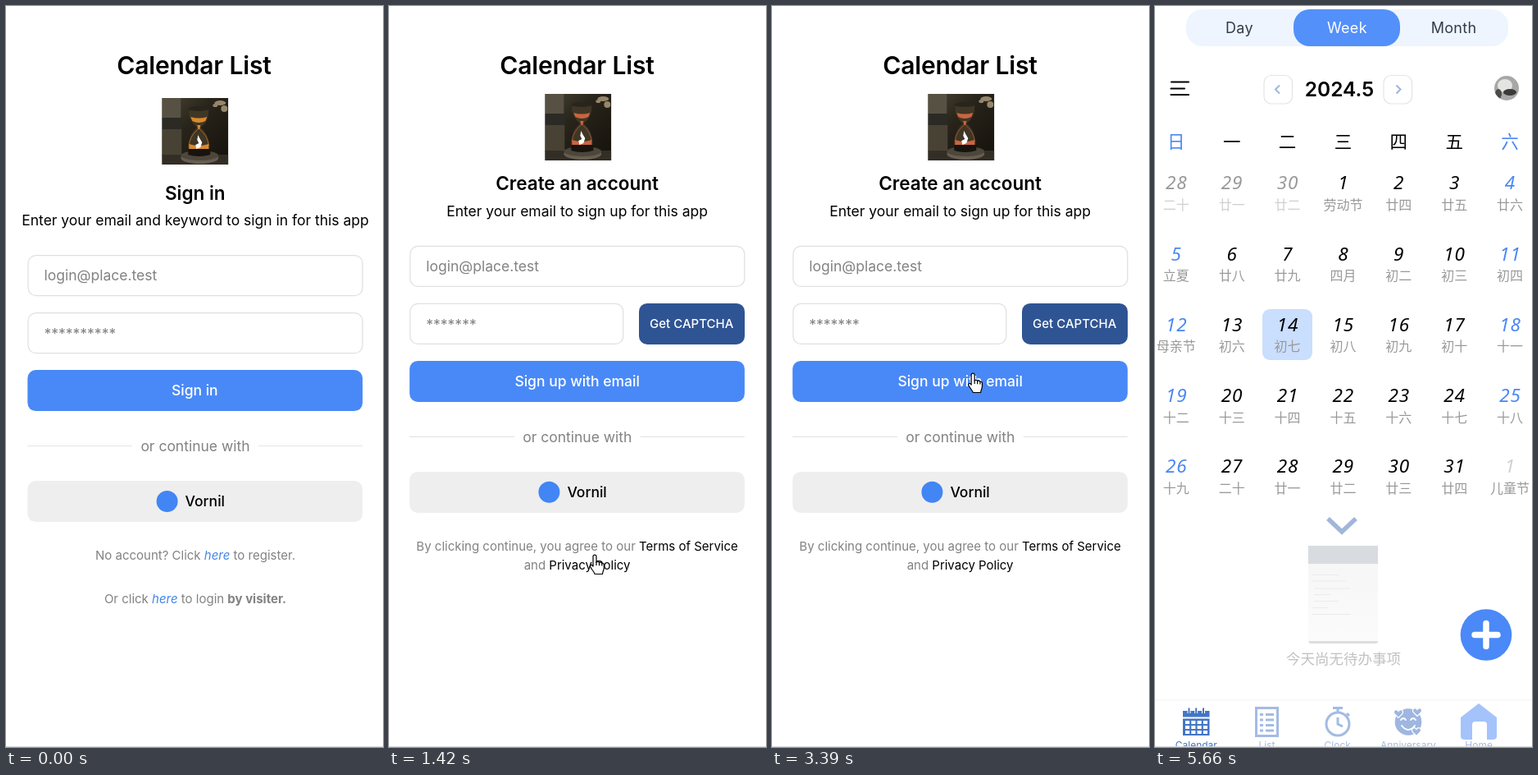
Animation of 460x902 px, one loop 6060 ms. Source, as an HTML page:

```html
<!DOCTYPE html>
<html lang="zh-CN">
<head>
<meta charset="utf-8">
<title>Calendar List</title>
<style>
html, body { margin: 0; width: 100%; height: 100%; overflow: hidden; background: #fff; }
svg { display: block; width: 100%; height: 100%; }
text { font: 17.5px Inter, sans-serif; white-space: pre; }
.mid { text-anchor: middle; }
.title { font-size: 30px; font-weight: 600; letter-spacing: -.005em; }
.head { font-size: 22.5px; font-weight: 600; }
.grey { fill: #828282; }
.med { font-weight: 500; }
.small { font-size: 15px; }
.link { fill: #4285e8; font-style: italic; }
.field { fill: #fff; stroke: #e0e0e0; stroke-width: 1.25; }
.line { fill: none; stroke: #e4e4e4; stroke-width: 1.2; }
.seg { font-size: 18px; letter-spacing: .3px; fill: #343a48; }
.day { font: italic 500 22.5px "Noto Sans", sans-serif; letter-spacing: .8px; }
.cjk { font: 16px "Noto Sans CJK SC", "Noto Sans CJK", sans-serif; }
.tab { font-size: 12px; fill: #a3bbe4; }
</style>
</head>
<body>
<svg viewBox="0 0 460 902">
  <defs>
    <clipPath id="square"><path d="M0 0H81V81H0Z"/></clipPath>
    <clipPath id="disc"><circle cx="429" cy="100" r="15"/></clipPath>
    <linearGradient id="wall" x2="1" y2="1">
      <stop stop-color="#484434"/><stop offset=".4" stop-color="#28241a"/><stop offset="1" stop-color="#14110c"/>
    </linearGradient>
    <linearGradient id="paper" x2="0" y2="1">
      <stop stop-color="#f5f5f5"/><stop offset="1" stop-color="#fbfbfb"/>
    </linearGradient>
    <g id="photo" clip-path="url(#square)">
      <path fill="url(#wall)" d="M0 0H81V81H0Z"/>
      <path fill="#565143" d="M0 0H23V24H0Z"/>
      <path fill="#2b2a24" d="M0 24H24V38H0Z"/>
      <path fill="#474233" d="M0 38H24V70H0Z"/>
      <path fill="#332e25" d="M0 69H81V81H0Z"/>
      <g fill="#96866a">
        <ellipse cx="71" cy="6" rx="7" ry="3"/><ellipse cx="76" cy="13" rx="4" ry="4"/><ellipse cx="65" cy="9" rx="3" ry="2"/>
      </g>
      <ellipse cx="46" cy="73" rx="23" ry="7" fill="#665e50"/>
      <ellipse cx="46" cy="70" rx="23" ry="6" fill="#4d463a"/>
      <path fill="#403625" d="M33 14Q45 8 57 14Q58 28 47 36Q59 46 58 64H32Q31 46 43 36Q32 28 33 14Z"/>
      <path fill="currentColor" d="M35 23Q45 26 55 23L53 28Q45 32 37 28ZM43 33H47L46 38H44ZM33 56Q45 60 57 56V63H33Z"/>
      <path fill="none" stroke="currentColor" opacity=".6" d="M44 38Q34 46 33 58M46 38Q56 46 57 58"/>
      <path fill="#fff" d="M44 45L46 49L49 54L47 60L42 62L41 57L45 55L43 51Z"/>
      <path fill="#17130e" d="M32 62H59V69Q45 73 32 69Z"/>
      <ellipse cx="45" cy="13" rx="13" ry="3" fill="#2a251c"/>
    </g>
    <g id="form">
      <rect class="field" x="27" y="303.6" width="408" height="49" rx="9.5"/>
      <text class="grey" x="46.5" y="334.4">login@place.test</text>
      <rect x="26.3" y="443.1" width="408.8" height="50" rx="10" fill="#4989f7"/>
      <path class="line" d="M26.3 535.5H154M308 535.5H435"/>
      <text class="mid grey" x="231" y="542">or continue with</text>
      <rect x="26.3" y="578.1" width="408.8" height="50" rx="10" fill="#eee"/>
      <circle cx="196.6" cy="603" r="13" fill="#4285f4"/>
      <text class="med" x="218.6" y="609.4">Vornil</text>
    </g>
  </defs>

  <g id="signIn">
    <text class="mid title" x="229.5" y="83">Calendar List</text>
    <use href="#photo" x="190.3" y="112" color="#d98a2e"/>
    <text class="mid head" x="230.8" y="235.8">Sign in</text>
    <text class="mid" x="231" y="267">Enter your email and keyword to sign in for this app</text>
    <use href="#form"/>
    <rect class="field" x="27" y="373.6" width="408" height="49" rx="9.5"/>
    <text class="grey" x="46.5" y="404.8">**********</text>
    <text class="mid med" x="230.3" y="474.4" fill="#fff">Sign in</text>
    <text class="mid small grey" x="231" y="674.3">No account? Click <tspan class="link">here</tspan> to register.</text>
    <text class="mid small grey" x="231" y="726.8">Or click <tspan class="link">here</tspan> to login <tspan font-weight="700">by visiter.</tspan></text>
  </g>

  <g id="signUp">
    <text class="mid title" x="229.5" y="83">Calendar List</text>
    <use href="#photo" x="190.3" y="107" color="#cb6440"/>
    <text class="mid head" x="229.6" y="224.4">Create an account</text>
    <text class="mid" x="229.6" y="255.7">Enter your email to sign up for this app</text>
    <use href="#form" x="-1.2" y="-11.2"/>
    <rect class="field" x="25.8" y="362.4" width="260" height="49" rx="9.5"/>
    <text class="grey" x="45.3" y="393.7">*******</text>
    <rect x="305" y="361.9" width="129" height="50" rx="10" fill="#2f5493"/>
    <text class="mid med small" x="369.2" y="392.4" fill="#fff">Get CAPTCHA</text>
    <text class="mid med" x="229.6" y="463.2" fill="#fff">Sign up with email</text>
    <text class="mid small grey" x="229.6" y="663">By clicking continue, you agree to our <tspan fill="#000">Terms of Service</tspan></text>
    <text class="mid small grey" x="229.6" y="685.6">and <tspan fill="#000">Privacy Policy</tspan></text>
  </g>

  <g id="calendar">
    <rect x="38" y="4" width="393" height="45" rx="20" fill="#eef5fe"/>
    <rect x="169" y="4" width="130" height="45" rx="20" fill="#5490fa"/>
    <text class="mid seg" x="103" y="33">Day</text>
    <text class="mid seg" x="234.4" y="33" style="fill:#fff">Week</text>
    <text class="mid seg" x="364.5" y="33">Month</text>
    <path d="M20 92.5H41M19.5 100.5H36M19.5 108H41" stroke="#000" stroke-width="2.2" stroke-linecap="round"/>
    <g class="line">
      <rect x="133" y="84.5" width="34.5" height="34.5" rx="9"/>
      <rect x="279" y="84.5" width="34.5" height="34.5" rx="9"/>
    </g>
    <path d="M152 96.5L147 101.5L152 106.5M294.5 96.5L299.5 101.5L294.5 106.5" fill="none" stroke="#9fb5db" stroke-width="2"/>
    <text class="mid" x="225" y="109.5" style="font-size:24.5px;font-weight:600">2024.5</text>
    <g clip-path="url(#disc)">
      <path fill="#a8a8a6" d="M414 85H444V115H414Z"/>
      <ellipse cx="427" cy="97" rx="9" ry="8" fill="#e4e4e2"/>
      <ellipse cx="433" cy="105" rx="8" ry="4" fill="#3b3b3a"/>
      <ellipse cx="419" cy="107" rx="4" ry="6" fill="#4a4a48"/>
    </g>
    <rect x="131" y="369" width="61" height="62" rx="9" fill="#cadefd"/>
    <g id="grid"></g>
    <path d="M211 624L228 640L245 624" fill="none" stroke="#a2b6d9" stroke-width="5.5"/>
    <rect x="187.5" y="659" width="84.5" height="117" rx="2" fill="#dedede"/>
    <path fill="url(#paper)" d="M187 657H272V773H187Z"/>
    <path fill="#d8dce0" d="M187 657H272V679H187Z"/>
    <path d="M192 692.5H225M192 700H232M195 709H238M194 716.5H215M194 724.5H224M192 732.5H211M192 740.5H239" stroke="#ebebeb"/>
    <text class="mid cjk" x="230" y="801" fill="#c2c2c2" style="font-size:17.5px">今天尚无待办事项</text>
    <circle cx="404" cy="765.5" r="31.3" fill="#4a89f7"/>
    <path d="M390 765.5H418M404 751.5V779.5" stroke="#fff" stroke-width="7.5" stroke-linecap="round"/>
    <path d="M0 845H460" stroke="#f1f1f1"/>

    <g fill="#4375c6">
      <path d="M34 858H66.5V865.5H34Z"/>
      <path d="M34 867.5H66.5V888H34Z"/>
      <path d="M41.5 855V861M50.2 855V861M59 855V861" stroke="#fff" stroke-width="4"/>
      <path d="M41.5 854.5V861M50.2 854.5V861M59 854.5V861" stroke="#4375c6" stroke-width="2"/>
      <path d="M37 872H64M37 878H64M37 884H64" stroke="#fff" stroke-width="3.8" stroke-dasharray="5.1 2.2"/>
    </g>
    <g fill="none" stroke="#a3bbe4" stroke-width="3">
      <path d="M123.5 854.5H149.5V888.5H123.5Z"/>
      <path d="M128 862.5H132M135 862.5H145M128 869H132M135 869H145M128 875.5H132M135 875.5H145M128 882H132M135 882H145"/>
      <circle cx="223" cy="874" r="14"/>
      <path d="M217 854.5H229M223 855V860M234 861L237 864M223 866V874L229 877"/>
    </g>
    <circle cx="309" cy="871.5" r="16.3" fill="#9fb6e0"/>
    <path d="M300 869Q303 865 306 869M312 869Q315 865 318 869M301 876Q309 886 317 876" fill="none" stroke="#fff" stroke-width="2" stroke-linecap="round"/>
    <g id="hearts" fill="#9fb6e0" stroke="#fff" stroke-width="1.2"></g>
    <path d="M373 870V866L395 849L417 866V889Q417 893 412 893H403V876H387V893H378Q373 893 373 889Z" fill="#a4c3fb"/>
    <path d="M387 893V875Q387 871 391 871H401Q405 871 405 875V893Z" fill="#fff"/>
    <g id="tabs"></g>
  </g>

  <path d="M0 901.5H460" stroke="#dcdcdc"/>
  <g id="cursor" stroke="#000" fill="#fff" stroke-linejoin="round">
    <path id="arrow" d="M.5 .5V16.5L4.2 13.2L7 19.5L9.4 18.4L6.7 12.3H11.8Z"/>
    <g id="hand" stroke-width="1.2">
      <path d="M-2 13V1.2a2 2 0 0 1 4 0V8c1-1 3-.9 3.5.6 1-.9 2.8-.6 3.3.9 1.2-.6 2.5 0 2.5 1.8V15c0 3-1.6 4-1.8 7.5H0C-.4 20-3 18-5.3 13.7c-.8-1.6 1.2-3 2.4-1.8Z"/>
      <path fill="none" d="M2 7.5V12M5.5 8.6V12.2M8.8 9.6V12.6"/>
    </g>
  </g>
</svg>
<script>
const $ = id => document.getElementById(id);
const LOOP = 6060, STEP = 68, BLUE = '#4a87f3';
const label = (cls, x, y, fill, s) => `<text class="mid ${cls}" x="${x}" y="${y}" style="fill:${fill}">${s}</text>`;

// Month grid
const lunar = ('二十 廿一 廿二 劳动节 廿四 廿五 廿六 立夏 廿八 廿九 四月 初二 初三 初四 ' +
  '母亲节 初六 初七 初八 初九 初十 十一 十二 十三 十四 十五 十六 十七 十八 ' +
  '十九 二十 廿一 廿二 廿三 廿四 儿童节').split(' ');
const colX = c => 25.8 + 67.87 * c;
const dayColor = (i, c) => i < 3 ? '#999' : i > 33 ? '#d0d0d0' : c % 6 ? '#000' : BLUE;
let grid = '';
[...'日一二三四五六'].forEach((s, c) => {
  grid += `<text class="mid cjk" x="${colX(c)}" y="173" style="font-size:21.5px;fill:${c % 6 ? '#000' : BLUE}">${s}</text>`;
});
lunar.forEach((s, i) => {
  const c = i % 7, y = 223.3 + 86.2 * Math.floor(i / 7);
  const day = i < 3 ? 28 + i : (i - 3) % 31 + 1;
  grid += label('day', colX(c) + .4, y, dayColor(i, c), day);
  grid += label('cjk', colX(c), y + 24.7, i < 3 ? '#cfcfcf' : '#999', s);
});
$('grid').innerHTML = grid;

$('tabs').innerHTML = ['Calendar', 'List', 'Clock', 'Anniversary', 'Home']
  .map((s, i) => label('tab', 50.3 + 86.2 * i, 904, i ? '#a3bbe4' : '#4375c6', s)).join('');
$('hearts').innerHTML = [[320, 859], [297, 861], [319, 883]]
  .map(([x, y]) => `<path transform="translate(${x} ${y})" d="M0 5.5L-5 .5C-7-4-2-6 0-2.5C2-6 7-4 5 .5Z"/>`).join('');

// Pointer moves: start time, steps, easing, Bezier points
const linear = s => s;
const easeIn = s => s * s;
const easeOut = s => 1 - (1 - s) ** 2;
const easeBoth = s => s * s * (3 - 2 * s);
const moves = [
  [400, 9, easeOut, [[412, 931], [251, 670]]],
  [1020, 2, linear, [[251, 670], [251, 669]]],
  [1960, 9, easeBoth, [[251, 669], [137, 354]]],
  [2580, 9, linear, [[137, 354], [160, 280], [361, 390], [270, 433]]],
  [3200, 4, easeOut, [[270, 433], [243.5, 449]]],
  [5000, 3, easeIn, [[243, 448], [413, 580]]],
  [5460, 3, linear, [[408.5, 779], [452, 888]]]
];

function bezier(pts, s) {
  while (pts.length > 1)
    pts = pts.slice(1).map((p, i) => p.map((v, j) => pts[i][j] + (v - pts[i][j]) * s));
  return pts[0];
}

const show = (id, on) => $(id).setAttribute('display', on ? 'inline' : 'none');

function draw() {
  const t = performance.now() % LOOP;
  show('signIn', t < 1290);
  show('signUp', t >= 1290 && t < 4320);
  show('calendar', t >= 4320);

  const move = moves.filter(m => m[0] <= t).pop();
  const hand = t >= 950 && t < 4320;
  show('cursor', move && (t < 5190 || t >= 5460 && t < 5660));
  show('hand', hand);
  show('arrow', !hand);
  if (move) {
    const [start, n, ease, pts] = move;
    const k = Math.min(n, Math.floor((t - start) / STEP) + 1);
    $('cursor').setAttribute('transform', `translate(${bezier(pts, ease(k / n))})`);
  }
  requestAnimationFrame(draw);
}
draw();
</script>
</body>
</html>
```
